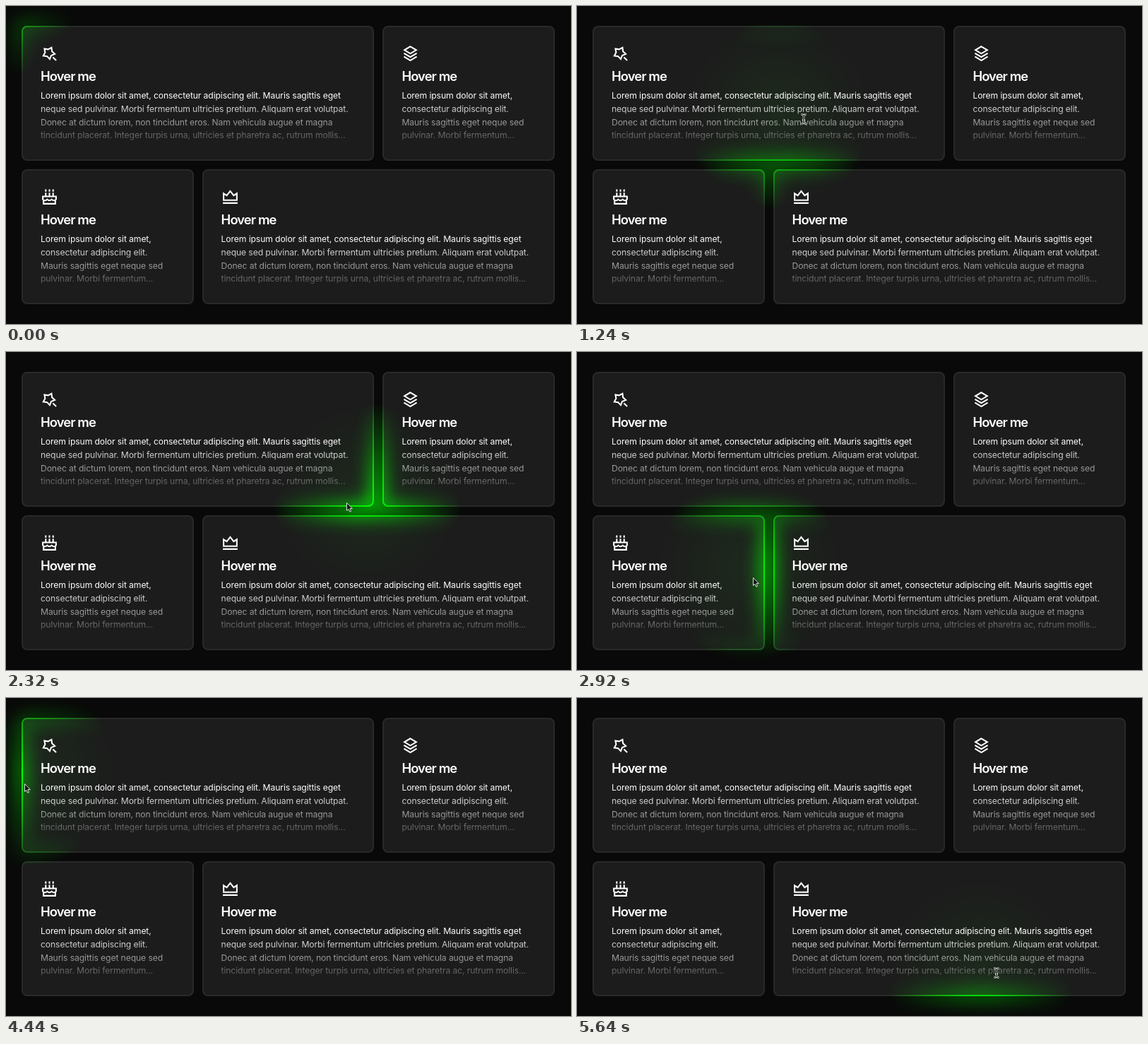
Animation, 800 px wide and 450 px high, one loop 5680 ms. Source, as an HTML page:

```html
<!DOCTYPE html>
<html lang="en">
<head>
<meta charset="utf-8">
<title>Glowing cards</title>
<style>
  html, body { margin: 0; width: 100%; height: 100%; overflow: hidden; background: #090909; }
  #stage {
    position: absolute; left: 0; top: 0; width: 800px; height: 450px; overflow: hidden;
    font-family: Inter, "Liberation Sans", sans-serif; color: #fff;
  }
  #stage > div, .halo > div { position: absolute; inset: 0; }
  .box { position: absolute; box-sizing: border-box; height: 190.5px; border-radius: 8px; }
  .base .box { background: #1c1c1c; border: 2px solid #292929; }
  .spot .box { background: #3f3; }
  .line .box { border: 2px solid #0f0; }
  .halo .box { outline: 10px solid #0f0; outline-offset: -5px; }
  .halo > div { filter: blur(13px); }
  .lit {
    --light: radial-gradient(circle 135px at var(--x) var(--y), #000, transparent);
    -webkit-mask-image: var(--light); mask-image: var(--light);
  }
  .spot { opacity: .06; }
  .icon { position: absolute; left: 27px; top: 26.5px; width: 25px; height: 25px; fill: none; stroke: #fff; stroke-width: 2; }
  h2 {
    position: absolute; left: 27px; top: 59px; margin: 0; white-space: nowrap;
    font-size: 18.4px; line-height: 24px; font-weight: 600; letter-spacing: -.05em;
  }
  p {
    --fade: linear-gradient(#000 12%, rgba(0,0,0,.2));
    position: absolute; left: 27px; top: 90px; margin: 0; white-space: pre;
    font-size: 12.2px; line-height: 18.75px; letter-spacing: -.01em;
    -webkit-mask-image: var(--fade); mask-image: var(--fade);
  }
  .cursor { position: absolute; left: 0; top: 0; width: 1px; height: 1px; overflow: visible; }
</style>
</head>
<body>
<div id="stage">
  <div class="base"></div>
  <div class="spot lit"></div>
  <div class="halo lit"><div></div></div>
  <div class="line lit"></div>
  <div class="text"></div>
  <svg class="cursor" id="arrow">
    <path d="M.5 .5V11.5L3 9.3 4.7 13.2 6.6 12.4 4.9 8.6H8.3Z" fill="#111" stroke="#ddd"/>
  </svg>
  <svg class="cursor" id="beam" fill="none">
    <path id="bar" d="M-3.5-6.5Q0-6.5 0-4V4Q0 6.5-3.5 6.5M3.5-6.5Q0-6.5 0-4V4Q0 6.5 3.5 6.5M-2 1.5H2" stroke="#eee" stroke-width="2.6"/>
    <path d="M-3.5-6.5Q0-6.5 0-4V4Q0 6.5-3.5 6.5M3.5-6.5Q0-6.5 0-4V4Q0 6.5 3.5 6.5" stroke="#222"/>
  </svg>
</div>
<script>
const LOOP = 5680, STEP = 40, ENTER = 960, LAG = 40;
const $ = s => document.querySelector(s);
const stage = $('#stage'), arrow = $('#arrow'), beam = $('#beam');

const wide = `Lorem ipsum dolor sit amet, consectetur adipiscing elit. Mauris sagittis eget
neque sed pulvinar. Morbi fermentum ultricies pretium. Aliquam erat volutpat.
Donec at dictum lorem, non tincidunt eros. Nam vehicula augue et magna
tincidunt placerat. Integer turpis urna, ultricies et pharetra ac, rutrum mollis...`;
const narrow = `Lorem ipsum dolor sit amet,
consectetur adipiscing elit.
Mauris sagittis eget neque sed
pulvinar. Morbi fermentum...`;

const candles = [7, 12, 17].map(x => `M${x} 6V10M${x} 1.5V4.5`).join('');
const chevrons = [11.3, 16].map(y => `M3.3 ${y}l8.7 5.2 8.7-5.2`).join('');
const icons = {
  star: 'M5.2 5.2 10.2 6.1 14.8 3.7 15.5 8.8 19.3 12.4 14.4 14.4 12.4 19.3 8.8 15.5 3.7 14.8 6.1 10.2ZM16.7 16.7 21.2 21.2',
  stack: 'M12 2.2 20 7 12 11.8 4 7Z' + chevrons,
  cake: candles + 'M3 15V11H21V15Q18 18 15 15Q12 18 9 15Q6 18 3 15ZM4 16V21H20V16',
  crown: 'M2 20H22M3 7 7.3 9.8 12 3.7 16.7 9.8 21 7V16H3Z'
};

const LEFT = 22, RIGHT = 777, WIDE = 499.4, NARROW = 243.6;
const card = (x, y, w, icon) => ({ x, y, w, icon, text: w === WIDE ? wide : narrow });
const cards = [
  card(LEFT, 28, WIDE, 'star'), card(RIGHT - NARROW, 28, NARROW, 'stack'),
  card(LEFT, 231, NARROW, 'cake'), card(RIGHT - WIDE, 231, WIDE, 'crown')
];

const box = (c, inner = '') =>
  `<div class="box" style="left:${c.x}px;top:${c.y}px;width:${c.w}px">${inner}</div>`;
const content = c =>
  `<svg class="icon" viewBox="0 0 24 24"><path d="${icons[c.icon]}"/></svg><h2>Hover me</h2><p>${c.text}</p>`;

for (const s of ['.base', '.spot', '.halo > div', '.line'])
  $(s).innerHTML = cards.map(c => box(c)).join('');
$('.text').innerHTML = cards.map(c => box(c, content(c))).join('');

// Turning points of the pointer: time, x, y
const path = [
  [920, -30, -26], [1000, 50, 80], [1240, 321, 160], [1800, 690, 185],
  [2100, 645, 165], [2320, 482, 213], [2620, 305, 230], [2920, 249, 319],
  [3140, 410, 386], [3440, 740, 320], [3720, 756, 157], [3940, 620, 56],
  [4300, 60, 72], [4440, 26, 121], [4560, 32, 160], [4780, 120, 345],
  [5280, 447, 389], [5480, 447, 389], [5640, 594, 389]
];

function slope(i, k) {
  const a = path[i - 1], b = path[i], c = path[i + 1];
  if (!a || !c || a[k] === b[k] || b[k] === c[k]) return 0;
  return (c[k] - a[k]) / (c[0] - a[0]);
}

// Smooth cubic through the turning points
function pointAt(t) {
  let i = 0;
  while (i < path.length - 2 && path[i + 1][0] <= t) i++;
  const a = path[i], b = path[i + 1], d = b[0] - a[0];
  const u = Math.min(1, Math.max(0, (t - a[0]) / d)), v = 1 - u;
  return [1, 2].map(k =>
    v * v * (1 + 2 * u) * a[k] + u * u * (3 - 2 * u) * b[k] +
    d * u * v * (v * slope(i, k) - u * slope(i + 1, k)));
}

const overText = (x, y) => cards.some(c =>
  x > c.x + 27 && x < c.x + c.w - 27 && y > c.y + 59 && y < c.y + 165);

function draw(now) {
  const t = Math.floor(now % LOOP / STEP) * STEP;
  const [gx, gy] = pointAt(t - LAG), [x, y] = pointAt(t);
  stage.style.setProperty('--x', gx + 'px');
  stage.style.setProperty('--y', gy + 'px');
  const shown = t >= ENTER, text = overText(x, y);
  arrow.style.display = shown && !text ? '' : 'none';
  beam.style.display = shown && text ? '' : 'none';
  arrow.style.transform = beam.style.transform = `translate(${x}px, ${y}px)`;
}

const start = performance.now();
function tick() {
  draw(performance.now() - start);
  requestAnimationFrame(tick);
}
tick();
</script>
</body>
</html>
```
